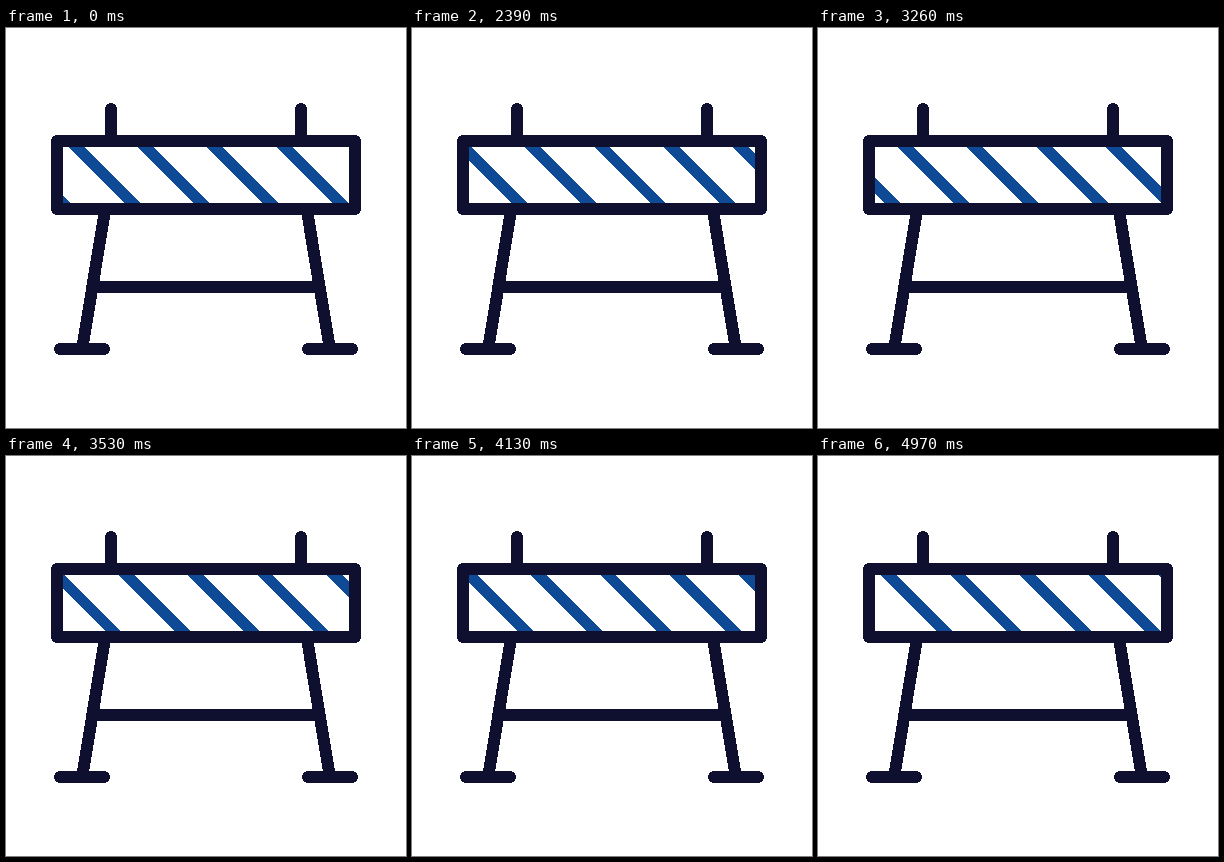
An HTML page that plays this animation: 400 px wide and 400 px high, repeating every 5.03 s.

```html
<!DOCTYPE html>
<html lang="en">
<head>
<meta charset="utf-8">
<title>Barrier</title>
<style>
  html, body { margin: 0; width: 100%; height: 100%; overflow: hidden; background: #fff; }
  svg { display: block; width: 100vw; height: 100vh; shape-rendering: crispEdges; }
  .frame { fill: none; stroke: #0f1030; stroke-width: 12; stroke-linecap: round; stroke-linejoin: round; }
</style>
</head>
<body>
<svg viewBox="0 0 400 400">
  <clipPath id="board"><rect x="54" y="116" width="292" height="62"/></clipPath>
  <g clip-path="url(#board)"><path id="stripes" fill="#0e4a96"/></g>
  <g class="frame">
    <path d="M105 81V113M295 81V113"/>
    <path d="M98.8 184L76.4 319M301.2 184L323.6 319M88 259H312"/>
    <path d="M54 321H98M302 321H346"/>
    <rect x="51" y="113" width="298" height="68"/>
  </g>
</svg>
<script>
  const LOOP = 5030, HOLD = 2030, STEP = 30, STEPS = 99;
  const PITCH = 69.3, TRAVEL = 6 * PITCH + 0.5;
  const stripes = document.getElementById('stripes');

  // Ten 45-degree bands; the first and last bound the run
  let d = '';
  for (let i = -6; i <= 3; i++) {
    d += `M${59.3 + i * PITCH} 116h15.8l62 62h-15.8z`;
  }
  stripes.setAttribute('d', d);

  const bezier = (s, a, b) => 3 * (1 - s) ** 2 * s * a + 3 * (1 - s) * s * s * b + s ** 3;

  function ease(x) {
    if (x <= 0 || x >= 1) return x <= 0 ? 0 : 1;
    let low = 0, high = 1;
    for (let i = 0; i < 30; i++) {
      const mid = (low + high) / 2;
      if (bezier(mid, 0.27, 1) < x) low = mid; else high = mid;
    }
    return bezier(low, 0.267, 0.811);
  }

  function draw(time) {
    const t = time % LOOP;
    const step = Math.max(0, Math.min(STEPS, Math.floor((t - HOLD) / STEP) + 1));
    stripes.setAttribute('transform', `translate(${TRAVEL * ease(step / STEPS)} 0)`);
  }

  const start = performance.now();
  function tick() {
    draw(performance.now() - start);
    requestAnimationFrame(tick);
  }
  tick();
</script>
</body>
</html>
```
